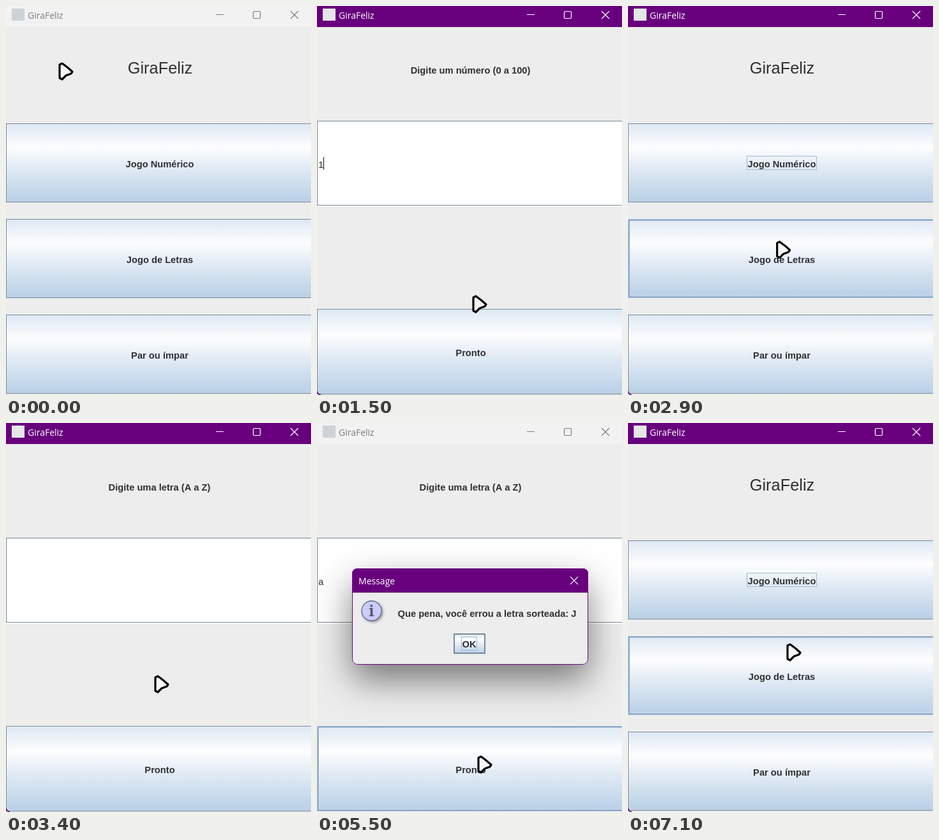
Animation, 478 px wide and 610 px high, one loop 7200 ms. Source, as an HTML page with a canvas:

```html
<!DOCTYPE html>
<html lang="pt">
<head>
<meta charset="utf-8">
<title>GiraFeliz</title>
<style>
html, body { margin: 0; width: 100%; height: 100%; overflow: hidden; background: #ededed; }
canvas { display: block; }
</style>
</head>
<body>
<canvas id="stage" width="478" height="610"></canvas>
<script>
const W = 478, H = 610, LOOP = 7200, STEP = 100;
const ctx = document.getElementById('stage').getContext('2d');
const APP = 'GiraFeliz';
const SANS = '"Liberation Sans", Arial, sans-serif';
const BOLD = 'bold 14.7px ' + SANS;
const PLAIN = '15px ' + SANS;
const CAPTION = '14px "Open Sans", "Noto Sans", sans-serif';
const PURPLE = '#68007d', GRAY = '#ededed', INK = '#303033', EDGE = '#7a8a99', BLUE = '#b8cfe5';

// Pointer tip: time, x, y
const PATH = [
  [0, 84, 90], [100, 100, 110], [500, 236, 238], [700, 240, 245], [900, 262, 275],
  [1200, 258, 350], [1300, 253, 385], [1500, 245, 455], [1800, 259, 528], [2200, 259, 528],
  [2500, 233, 343], [2700, 233, 343], [3000, 234, 383], [3200, 234, 390], [3400, 234, 397],
  [3700, 238, 420], [4400, 253, 523], [5500, 253, 523], [6000, 241, 346], [6400, 241, 346],
  [6700, 244, 349], [7100, 250, 347], [7200, 250, 347]
];

// Screen shown from each time on
const SCREENS = [[0, 'menu'], [700, 'number'], [2700, 'menu'], [3200, 'letter'], [6400, 'menu']];

const FORMS = {
  number: { label: 'Digite um número (0 a 100)', key: '1', typed: 1000, caret: [700, 1900] },
  letter: { label: 'Digite uma letra (A a Z)', key: 'a', typed: 4800, caret: [4800, 5000] }
};

const DIALOGS = [
  { from: 1900, to: 2700, x: 41, y: 229, w: 396, h: 148, text: 'Que pena, você errou o número sorteado: 45', okW: 48, okH: 31 },
  { from: 5400, to: 6400, x: 55, y: 228, w: 370, h: 151, text: 'Que pena, você errou a letra sorteada: J', okW: 50, okH: 32 }
];

const MENU = [
  { text: 'Jogo Numérico', y: 184, press: 600 },
  { text: 'Jogo de Letras', y: 334, press: 3100 },
  { text: 'Par ou ímpar', y: 484, press: -1 }
];

const within = (t, a, b) => t >= a && t < b;

function pointerAt(t) {
  const i = PATH.findIndex((p, n) => n && t <= p[0]);
  const a = PATH[i - 1], b = PATH[i];
  const k = (t - a[0]) / (b[0] - a[0]);
  return { x: a[1] + (b[1] - a[1]) * k, y: a[2] + (b[2] - a[2]) * k };
}

function rect(x, y, w, h, color) {
  ctx.fillStyle = color;
  ctx.fillRect(x, y, w, h);
}

function frame(x, y, w, h, color) {
  ctx.strokeStyle = color;
  ctx.lineWidth = 1;
  ctx.strokeRect(x + 0.5, y + 0.5, w - 1, h - 1);
}

function write(text, x, y, font, color = INK, align = 'left') {
  ctx.font = font;
  ctx.fillStyle = color;
  ctx.textAlign = align;
  ctx.fillText(text, x, y);
}

function cross(x, y, color) {
  ctx.strokeStyle = color;
  ctx.lineWidth = 1.2;
  ctx.beginPath();
  ctx.moveTo(x - 6, y - 6); ctx.lineTo(x + 6, y + 6);
  ctx.moveTo(x + 6, y - 6); ctx.lineTo(x - 6, y + 6);
  ctx.stroke();
}

function metal(x, y, w, h, pressed) {
  const g = ctx.createLinearGradient(0, y, 0, y + h);
  g.addColorStop(0, '#dde8f3');
  g.addColorStop(0.3, '#fdfdfe');
  g.addColorStop(0.6, '#dde8f3');
  g.addColorStop(1, BLUE);
  rect(x, y, w, h, pressed ? BLUE : g);
}

function wideButton(text, y, h, hover, pressed) {
  const w = W + 4;
  metal(0, y, w, h, pressed);
  if (hover && !pressed) {
    frame(0, y, w, h, BLUE);
    frame(1, y + 1, w - 2, h - 2, '#6a86b0');
    frame(2, y + 2, w - 4, h - 4, BLUE);
  } else {
    frame(0, y, w, h, EDGE);
  }
  write(text, 241, Math.round(y + h / 2) + 7, BOLD, INK, 'center');
}

function titleBar(active) {
  const color = active ? '#fff' : '#7c7c7e';
  rect(0, 0, W, 33, active ? PURPLE : '#f2f2f3');
  rect(9, 4, 20, 19, active ? '#e4e6e8' : '#cdd2d6');
  write(APP, 34, 20, CAPTION, color);
  rect(329, 13, 12, 1, color);
  ctx.strokeStyle = color;
  ctx.lineWidth = 1.2;
  ctx.beginPath();
  ctx.roundRect(387.5, 8.5, 11, 11, 1.5);
  ctx.stroke();
  cross(452, 14, color);
}

function drawMenu(t, tip, active) {
  write(APP, 241.5, 106, '25.4px ' + SANS, INK, 'center');
  for (const b of MENU) {
    const hover = tip.y >= b.y && tip.y < b.y + 124;
    wideButton(b.text, b.y, 124, hover, b.press === t);
  }
  if (active) frame(186, 235, 110, 22, '#a3b8cc');
}

function drawForm(f, t, tip, dialog) {
  write(f.label, 240.5, 106, BOLD, INK, 'center');
  rect(0, 180, W, 135, '#fff');
  frame(0, 180, W + 4, 133, EDGE);
  const typed = t >= f.typed;
  if (typed) write(f.key, 2, 254, PLAIN);
  if (within(t, ...f.caret)) rect(typed ? 10 : 2, 237, 1, 20, '#111');
  const pressed = t === 1800 || t === 5300;
  wideButton('Pronto', 475, 134, dialog || tip.y >= 475, pressed);
}

function infoIcon(x, y) {
  ctx.save();
  ctx.shadowColor = 'rgba(0,0,0,.45)';
  ctx.shadowBlur = 4;
  ctx.shadowOffsetX = ctx.shadowOffsetY = 2;
  ctx.beginPath();
  ctx.arc(x, y, 15.5, 0, 7);
  ctx.fillStyle = '#ccccfc';
  ctx.fill();
  ctx.restore();
  ctx.strokeStyle = '#66668c';
  ctx.lineWidth = 1.3;
  ctx.stroke();
  write('i', x, y + 8, 'bold 24px "Noto Serif", serif', '#58585f', 'center');
}

function drawDialog(d, t) {
  const { x, y, w, h } = d;
  ctx.save();
  ctx.shadowColor = 'rgba(0,0,0,.5)';
  ctx.shadowBlur = 55;
  ctx.shadowOffsetY = 24;
  ctx.beginPath();
  ctx.roundRect(x, y, w, h, 8);
  ctx.fillStyle = GRAY;
  ctx.fill();
  ctx.restore();
  ctx.save();
  ctx.clip();
  rect(x, y, w, 266 - y, PURPLE);
  ctx.restore();
  ctx.strokeStyle = PURPLE;
  ctx.lineWidth = 1;
  ctx.beginPath();
  ctx.roundRect(x + 0.5, y + 0.5, w - 1, h - 1, 8);
  ctx.stroke();
  write('Message', x + 10, 253, CAPTION, '#fff');
  cross(x + w - 22, 247, '#f3e6f6');
  infoIcon(x + 30.5, 294.5);
  write(d.text, x + 71.5, 303.5, BOLD);

  const okY = y + h - 49;
  const pressed = t === d.to - STEP;
  metal(214, okY, d.okW, d.okH, pressed);
  frame(214, okY, d.okW, d.okH, EDGE);
  frame(215, okY + 1, d.okW - 2, d.okH - 2, pressed ? BLUE : EDGE);
  frame(226, okY + 5, 25, 22, '#a3b8cc');
  write('OK', 238.5, okY + 22, BOLD, INK, 'center');
}

function drawPointer({ x, y }) {
  ctx.save();
  ctx.translate(x, y);
  ctx.beginPath();
  ctx.moveTo(0, 2);
  ctx.lineTo(4, 0);
  ctx.lineTo(12, 6);
  ctx.lineTo(20, 13);
  ctx.lineTo(18, 16);
  ctx.lineTo(10, 19);
  ctx.lineTo(4, 25);
  ctx.lineTo(0, 23);
  ctx.closePath();
  ctx.fillStyle = '#f7f7f8';
  ctx.fill();
  ctx.strokeStyle = '#000';
  ctx.lineWidth = 3.2;
  ctx.lineJoin = 'round';
  ctx.stroke();
  ctx.restore();
}

function windowCorner() {
  ctx.strokeStyle = PURPLE;
  ctx.lineWidth = 1.5;
  ctx.beginPath();
  ctx.moveTo(0, 604);
  ctx.quadraticCurveTo(1, 609, 6, 610);
  ctx.stroke();
}

function draw(ms) {
  const t = Math.floor((ms % LOOP) / STEP) * STEP;
  const tip = pointerAt(t);
  const dialog = DIALOGS.find(d => within(t, d.from, d.to));
  const active = t >= 600 && !dialog;
  const screen = SCREENS.filter(s => t >= s[0]).pop()[1];

  rect(0, 0, W, H, GRAY);
  titleBar(active);
  if (screen === 'menu') drawMenu(t, tip, active);
  else drawForm(FORMS[screen], t, tip, !!dialog);
  if (active) windowCorner();
  if (dialog) drawDialog(dialog, t);
  drawPointer(tip);
}

let start;
function tick(now) {
  start ??= now;
  draw(Math.max(0, now - start));
  requestAnimationFrame(tick);
}
draw(0);
requestAnimationFrame(tick);
</script>
</body>
</html>
```
